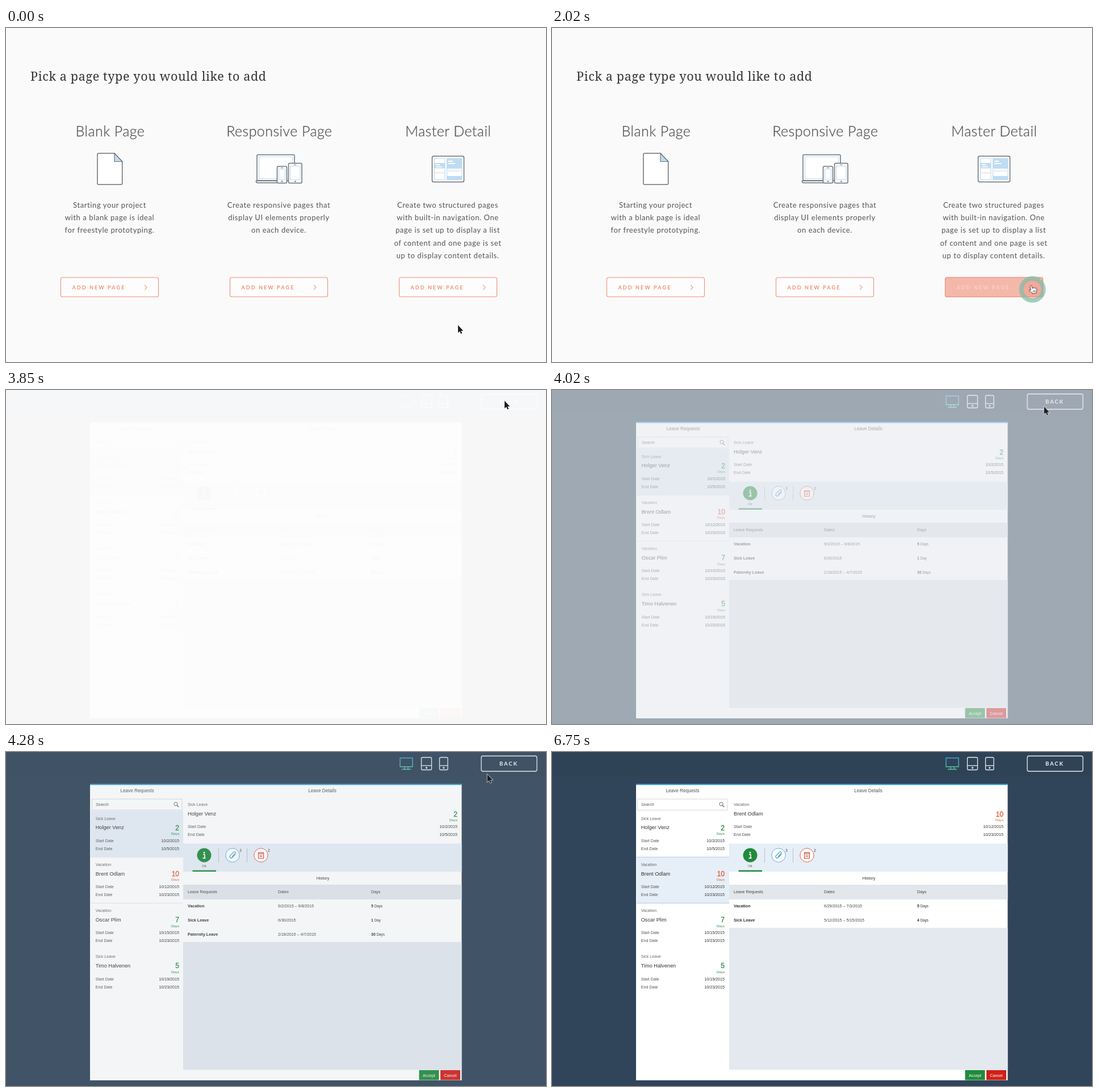
An HTML page that plays this animation: 951 px wide and 589 px high, repeating every 7330 ms.

```html
<!DOCTYPE html>
<html lang="en">
<head>
<meta charset="utf-8">
<title>Page builder walkthrough</title>
<style>
html, body { margin: 0; width: 100%; height: 100%; overflow: hidden; background: #fafafa; }
svg { display: block; width: 100%; height: 100%; }
.lato { font-family: Lato, "Open Sans", sans-serif; }
.arial { font-family: "Liberation Sans", Arial, sans-serif; }
.slab { font-family: "Noto Serif", serif; font-weight: 300; }
text { white-space: pre; }
.line { fill: none; stroke: #50575e; stroke-width: 1.1; }

/* 1% of the loop is 73.3 ms */
.anim { animation: 7.33s linear infinite; }
.cut { animation-timing-function: step-end; }
#picker { animation-name: picker; }
#hover { animation-name: hover; }
#editor { animation-name: editor; }
#dim { animation-name: dim; }
#preview { animation-name: preview; }
#first { animation-name: first; }
#second { animation-name: second; }
#veil { animation-name: veil; }
#ring1 { animation-name: ring1; }
#ring2 { animation-name: ring2; }
#cursor { animation-name: travel; animation-timing-function: ease-in-out; }
#pointer { animation-name: pointer; }
#arrow { animation-name: arrow; }
#hand { animation-name: hand; }

@keyframes picker { 0%, 30.4% { opacity: 1 } 32.5%, 100% { opacity: 0 } }
@keyframes hover { 0%, 24% { opacity: 0 } 26.5%, 100% { opacity: 1 } }
@keyframes editor { 0%, 32% { opacity: 0 } 36.2%, 51.5% { opacity: 1 } 51.6%, 100% { opacity: 0 } }
@keyframes dim { 0%, 37.5% { opacity: 0 } 40.93% { opacity: .14 } 45.7%, 100% { opacity: 1 } }
@keyframes preview { 0% { opacity: 0 } 51.55%, 100% { opacity: 1 } }
@keyframes first { 0% { opacity: 1 } 79.1%, 100% { opacity: 0 } }
@keyframes second { 0% { opacity: 0 } 79.1%, 100% { opacity: 1 } }
@keyframes veil {
  0%, 46.4% { fill: rgba(250,250,250,0) }
  49.8%, 51.6% { fill: rgba(250,250,250,1) }
  52.5%, 53.6% { fill: rgba(253,253,253,.97) }
  55.93%, 57% { fill: rgba(172,181,196,.3) }
  59.5%, 100% { fill: rgba(172,181,196,0) }
}
@keyframes ring1 {
  0%, 25.2% { opacity: 0; r: 8px; stroke-width: 2px }
  25.6% { opacity: 1; r: 10px; stroke-width: 3px }
  27.56%, 28.7% { opacity: 1; r: 19.5px; stroke-width: 8px }
  30.5%, 100% { opacity: 0; r: 25px; stroke-width: 10px }
}
@keyframes ring2 {
  0%, 72.6% { opacity: 0; r: 8px; stroke-width: 2px }
  73.94%, 75% { opacity: 1; r: 11.5px; stroke-width: 3.5px }
  76.5% { opacity: .8; r: 19px; stroke-width: 8px }
  78.5%, 100% { opacity: 0; r: 25px; stroke-width: 10px }
}
@keyframes travel {
  0%, 14.6% { transform: translate(796px,524px) }
  24.56%, 30.7% { transform: translate(843px,454px) }
  40.5%, 47% { transform: translate(882px,20px) }
  52%, 53.5% { transform: translate(878px,19px) }
  55.93%, 57% { transform: translate(859px,36px) }
  71.6%, 100% { transform: translate(236px,221px) }
}
@keyframes pointer { 0%, 86.6% { opacity: 1 } 88.5%, 100% { opacity: 0 } }
@keyframes arrow {
  0% { opacity: 1 } 23.5% { opacity: 0 } 31.5% { opacity: 1 } 39.8% { opacity: 0 }
  51.55% { opacity: 1 } 68.5%, 100% { opacity: 0 }
}
@keyframes hand {
  0% { opacity: 0 } 23.5% { opacity: 1 } 31.5% { opacity: 0 } 39.8% { opacity: 1 }
  51.55% { opacity: 0 } 68.5%, 100% { opacity: 1 }
}
</style>
</head>
<body>
<svg id="stage" viewBox="0 0 951 589"></svg>
<script>
const GREEN = '#218a3c', ORANGE = '#e4572e', SALMON = '#ef9079', SKY = '#bfdcf3', NAVY = '#17406b';

// y is the middle of the capitals
const text = (x, y, s, size, fill = '#444', more = '') =>
  `<text x="${x}" y="${y + size * .36}" font-size="${size}" fill="${fill}" ${more}>${s}</text>`;
const rect = (x, y, w, h, fill, more = '') =>
  `<rect x="${x}" y="${y}" width="${w}" height="${h}" fill="${fill}" ${more}/>`;
const path = (d, more = 'class="line"') => `<path d="${d}" ${more}/>`;
const circle = (x, y, r, more = 'class="line"') => `<circle cx="${x}" cy="${y}" r="${r}" ${more}/>`;
const ink = (color, width = 1, fill = 'none') => `fill="${fill}" stroke="${color}" stroke-width="${width}"`;
const spaced = (n, weight = 400) => ` letter-spacing="${n}" font-weight="${weight}"`;
const END = 'text-anchor="end"', MID = 'text-anchor="middle"', BOLD = 'font-weight="700"';

/* ---- page picker ---- */
function addButton(x) {
  const label = c => text(x + 20.5, 457.5, 'ADD NEW PAGE', 9, c, spaced(2.1, 700));
  const frame = fill => rect(x + .5, 440, 172, 34, fill, `rx="3" stroke="${SALMON}" stroke-width="1.1"`);
  const chevron = path(`M${x + 148} 453l4 4.5l-4 4.5`, ink(SALMON, 1.1));
  const base = frame('#fdfdfd') + label(SALMON) + chevron;
  return x < 600 ? base : base + `<g id="hover" class="anim">${frame('#f4b8ab')}${label('#f9d0c6')}</g>`;
}

function pickerIcons() {
  const edge = ink('#6a7178', 1.5, '#fff'), pale = ink(SKY, 1.2, '#fff');
  const device = (x, y, w, h) =>
    rect(x, y, w, h, '#fff', 'rx="2" stroke="#6a7178" stroke-width="1.5"') +
    path(`M${x + 3} ${y + 5}h${w - 6}v${h - 11}h${6 - w}z`, pale) +
    path(`M${x + w / 2 - 2} ${y + 2.7}h4`, ink('#6a7178')) +
    circle(x + w / 2, y + h - 3, 1.2, 'fill="#6a7178"');
  return path('M163 221H191L204.700 235.500V274q0 2-2 2H163q-2 0-2-2V223q0-2 2-2Z', edge) +
    path('M191 221V235.500H204.700Z', ink('#6a7178', 1.2, SKY)) +
    rect(442, 223.5, 66, 45.5, '#fff', 'rx="2" stroke="#6a7178" stroke-width="1.5"') +
    path('M445.500 227h59v38.500h-59z', pale) +
    path('M440.500 269.500H494v1.500q0 2-3 2H443.500q-3 0-3-2z', edge) +
    device(497.5, 238.5, 23.5, 35) + device(477.5, 244, 17, 29.5) +
    rect(750.5, 226, 56, 45.5, '#fff', 'rx="2.5" stroke="#6a7178" stroke-width="1.5"') +
    path('M754.500 230h18.500v37.500h-18.500z', pale) + rect(755, 238, 18, 9.5, SKY) +
    rect(757, 240, 7, 2, '#fff') + rect(757, 244, 11, 1.5, '#fff') +
    path('M755 255.500h18', ink('#e8c4c4', .8)) +
    path('M776.500 230h26.500v37.500h-26.500z', pale) + rect(776, 230, 27, 18, SKY) +
    rect(779, 234, 8, 2, '#fff') + rect(779, 238, 12, 2, '#fff') +
    path('M778 252h23', ink(SKY)) + rect(776, 261, 27, 6.5, SKY);
}

function picker() {
  const kinds = [
    [182.5, 'Blank Page', ['Starting your project', 'with a blank page is ideal', 'for freestyle prototyping.']],
    [480.5, 'Responsive Page', ['Create responsive pages that', 'display UI elements properly', 'on each device.']],
    [778, 'Master Detail', ['Create two structured pages', 'with built-in navigation. One', 'page is set up to display a list',
      'of content and one page is set', 'up to display content details.']]
  ];
  return rect(0, 0, 951, 589, '#fafafa') +
    `<g class="slab">${text(43, 85, 'Pick a page type you would like to add', 21.5, '#333', 'letter-spacing=".65"')}</g>` +
    kinds.map(([x, title, lines]) =>
      text(x + .9, 181.5, title, 25, '#555', MID + spaced(.45, 300) + ' stroke="#555" stroke-width=".3"') +
      lines.map((s, i) => text(x, 312 + i * 22.3, s, 13, '#555', MID + spaced(.6))).join('') +
      addButton(Math.round(x - 86.3))).join('') +
    pickerIcons();
}

/* ---- the designed app, shared by editor and preview ---- */
const people = [
  ['Sick Leave', 'Holger Venz', 2, '10/2/2015', '10/5/2015'],
  ['Vacation', 'Brent Odlam', 10, '10/12/2015', '10/23/2015'],
  ['Vacation', 'Oscar Plim', 7, '10/15/2015', '10/23/2015'],
  ['Sick Leave', 'Timo Halvenen', 5, '10/19/2015', '10/23/2015']
];
const history = [
  [['Vacation', '9/2/2015 – 9/8/2015', 5], ['Sick Leave', '6/30/2015', 1], ['Paternity Leave', '2/18/2015 – 4/7/2015', 30]],
  [['Vacation', '6/29/2015 – 7/3/2015', 5], ['Sick Leave', '5/12/2015 – 5/15/2015', 4]]
];

// offsets are those of name, number, unit and the two dates below the type
function request([type, name, days, start, end], x, y, right, [dName, dNum, dUnit, dStart, dEnd]) {
  const c = days > 9 ? ORANGE : GREEN;
  return text(x, y, type, 7.2, '#666') + text(x, y + dName, name, 9.2, '#333') +
    text(right, y + dNum, days, 12, c, `${END} stroke="${c}" stroke-width=".3"`) +
    text(right, y + dUnit, 'Days', 6.2, c, END) +
    text(x, y + dStart, 'Start Date', 7.15, '#555') + text(right, y + dStart, start, 7.15, '#333', END) +
    text(x, y + dEnd, 'End Date', 7.15, '#555') + text(right, y + dEnd, end, 7.15, '#333', END);
}

function list(picked, tint) {
  const top = i => 104 + i * 81.25;
  const rule = i => rect(149, top(i) - .4, 163, .8, picked ? '#9cc3e0' : '#dfe3e6');
  return rect(148, 56, 164, 523, '#fff') + rect(149, top(picked), 163, 81.25, tint) + rule(1) + rule(2) +
    `<g transform="translate(${picked ? -1 : 0} 0)">` +
    text(231, 68, 'Leave Requests', 8.2, '#555', MID) +
    rect(151.5, 83, 158.5, 19.5, '#fff', 'stroke="#ccc" stroke-width=".8"') +
    text(158, 92.8, 'Search', 7.2, '#555', 'font-style="italic"') +
    circle(299, 91.8, 3.1, ink('#555', .9)) + path('M301.300 94.100l3 3', ink('#555', 1.2)) +
    people.map((p, i) => request(p, 157.7, 117 + i * 81.25, 305, [16, 16.3, 27, 39.2, 53.2])).join('') + '</g>' +
    rect(148, 56, 164, 2.2, '#3497d8');
}

function detail(picked) {
  const rows = history[picked], bottom = 260 + rows.length * 25;
  const badge = (x, c) => circle(x, 182, 12.2, ink(c, 1, '#fff'));
  return rect(312, 56, 490.5, 523, '#fff') + rect(312, 56, 490.5, 2.2, '#3497d8') +
    text(557, 68, 'Leave Details', 8.2, '#555', MID) +
    request(people[picked], 320, 92.5, 795, [16.3, 16.8, 27, 39.2, 53.2]) +
    rect(312, 161.5, 490.5, 49.5, '#e6eef7') +
    circle(349, 182, 12.5, `fill="${GREEN}"`) + circle(349, 177.3, 1.4, 'fill="#fff"') +
    path('M347 180.500h2.800v6.500M346.500 187.200h5', ink('#fff', 1.7)) +
    text(349, 201, 'Ok', 6.2, '#555', MID) + rect(328.5, 208.5, 41.5, 2.5, GREEN) +
    path('M374.500 170v25M424.500 170v25', ink('#b9c0c6')) +
    badge(399, '#62ade0') + badge(449, '#e2614c') +
    `<g transform="rotate(45 399 182)">${path('M401.500 177v8.500a2.500 2.500 0 0 1-5 0v-9a1.800 1.800 0 0 1 3.600 0v8', ink('#3f97d4', 1.1))}</g>` +
    path('M444.500 177.500h9v10h-9zM444.500 179h9M446.500 182h5M446.500 184.500h5', ink('#d64a35', 1.1)) +
    text(413, 173.5, '3', 6.3, '#444', MID) + text(463, 173.5, '2', 6.3, '#444', MID) +
    text(558, 222.7, 'History', 7.3, '#333', MID) +
    rect(312, 234, 490.5, 26, '#e2e7ec') +
    text(320, 246.5, 'Leave Requests', 7.2) + text(479, 246.5, 'Dates', 7.2) + text(643, 246.5, 'Days', 7.2) +
    rows.map(([kind, dates, n], i) => {
      const y = 271.7 + i * 25;
      return text(320, y, kind, 7.2, '#333', BOLD) + text(479, y, dates, 7.1, '#444') +
        text(643, y, `<tspan ${BOLD}>${n}</tspan><tspan font-size="6.3"> ${n > 1 ? 'Days' : 'Day'}</tspan>`, 7, '#333');
    }).join('') +
    rect(312, bottom, 490.5, 560.5 - bottom, '#e3e9ef') +
    rect(727.5, 561, 35, 17.5, GREEN) + rect(765, 561, 35, 17.5, '#d0201a') +
    text(745, 570, 'Accept', 7.2, '#fff', MID) + text(782.5, 570, 'Cancel', 7.2, '#fff', MID);
}

/* ---- editor ---- */
function devices(x, desk, pad) {
  const p = ink(pad, 1.3);
  const mobile = (x, w) => rect(x, 9.5, w, 22, 'none', `rx="2" stroke="${pad}" stroke-width="1.3"`) +
    path(`M${x} 24h${w}`, p) + circle(x + w / 2, 27.8, 1, p);
  return path(`M${x} 10.500h22v15.500h-22zM${x + 8} 26v4M${x + 14} 26v4M${x + 3} 30.500h16`, ink(desk, 1.3)) +
    mobile(x + 37.5, 18) + mobile(x + 69.5, 14.5);
}

function toolbar() {
  const handles = [[416, 11], [434, 11], [416, 28], [434, 28]].map(([x, y]) => path(`M${x} ${y}h4v4h-4z`, ink('#50575e', 1.1, '#fff'))).join('');
  return rect(0, 0, 951, 44, '#fff') + rect(0, 43.5, 951, 1.5, '#dcdddf') +
    path('M22.500 11.500h7v5h-7zM26 16.500v5M20 25v-3.500h12.500V25M26 21.500V25M17.500 25h4.500v4.500h-4.500zM24 25h4.500v4.500h-4.500zM30.500 25h4.500v4.500h-4.500z') +
    devices(240.5, '#50575e', '#50575e') +
    path('M379.500 15.500h23v10h-23zM383 19v6M386.500 21v4M390 19v6M393.500 21v4M397 19v6M400 21v4') +
    path('M418 13h18v17h-18z') + handles +
    path('M456 11.500v19') + rect(457, 13.5, 8, 5.5, '#444b52') + rect(457, 22, 13, 5.5, '#444b52') +
    path('M534 13h16v16h-16zM539.500 13v16M569 13h16v16h-16zM579.500 13v16') +
    text(603, 21, '87%', 12, '#666', spaced(.4)) +
    path('M649 16l-4 4l4 4M645 20h14v6', ink('#b5b9bd', 1.2)) + path('M683 16l4 4l-4 4M687 20h-15v6') +
    path('M767 12.500h6M768.300 12.500v6l-6 11h15.500l-6-11v-6M765.500 23.500h9') +
    path('M802.500 14.500h14v12.500h-16.500v-9h2.500v9') + rect(805, 17, 5, 4.5, '#444b52') + path('M811.500 18h3.500M811.500 20.800h3.500M805 24h10') +
    rect(837, 7, 98, 27, '#fff', 'rx="3" stroke="#50575e" stroke-width="1.2"') +
    text(858, 20.7, 'PREVIEW', 9.5, '#555c63', spaced(2.1, 700));
}

function sidebar() {
  const tree = [153, 174.5, 198.5, 222.5];
  const label = (x, y, s, c = '#606468', w = 400) => text(x, y, s, 11.3, c, spaced(.45, w));
  const tab = (x, s, c) => text(x, 308.5, s, 8.5, c, spaced(1.3, 700));
  const frame = y => path(`M16 ${y - 11}h22v22h-22zM16 ${y - 5}h22`);
  const dashes = y => path(`M19 ${y}h16`, ink('#50575e', 1.5) + ' stroke-dasharray="3 1.5"');
  const dot = x => circle(x, 517.5, 2.2, 'fill="#50575e"');
  return rect(0, 45, 219, 544, '#fff') + rect(219, 45, 2, 544, '#e2e4e6') +
    text(16, 69, 'PAGES', 8.8, '#2c5a86', spaced(1.2, 700)) + path('M192 69h14M199 62v14') +
    label(16, 99.5, 'Master Page 1') + rect(16, 113, 2.5, 24, '#52b788') +
    label(29, 124.5, 'List <tspan font-size="9" font-weight="400" fill="#777">(5)</tspan>', '#45ae7c', 700) +
    path('M17.500 147v101M29.500 147v101', ink('#e4e4e4')) +
    tree.map(y => label(40, y, 'List Item')).join('') + label(40, 244, 'Search Field Toolbar') + label(16, 266.5, 'Detail Page 1', '#c2c4c6') +
    rect(0, 281.5, 219, 1, '#e6e8ea') + rect(99, 283, 19, 5.5, '#cfd3d6') +
    rect(0, 289.5, 219, 37, NAVY) + rect(0, 291, 71.5, 36, '#fff') + rect(144.5, 289, 1.3, 38, '#fff') +
    tab(9, 'CONTROLS', '#2c5a86') + tab(91, 'ASSETS', '#fff') + tab(169, 'DATA', '#fff') +
    path('M16 367V342h184.500V367', ink('#dfe2e4')) +
    circle(28, 354, 4) + path('M31 357l4 4', ink('#50575e', 1.6)) +
    text(42, 355.5, 'Find UI Element', 10.5, '#888', spaced(.15)) + path('M185 351.500l6.500 6.500M191.500 351.500l-6.500 6.500', ink('#888')) +
    ['Column', 'Column List Item', 'List', 'List Item', 'Table'].map((s, i) => label(53, 399 + i * 41.75, s)).join('') +
    frame(399) + path('M23 394v16M30.500 394v16') +
    frame(440.5) + dashes(432.5) +
    rect(16.5, 471.5, 18, 18, '#fff', 'stroke="#50575e"') + rect(18, 473, 15, 15, '#5fb98d') +
    path('M22 475l16 7l-6 2l6 6l-3 3l-6-6l-2.500 6z', 'fill="#444b52"') +
    dot(19) + dot(27) + dot(35) + path('M16 533v-8h6q2 4 5 4t5-4h6v8z') +
    frame(566) + dashes(558);
}

function editor() {
  return rect(0, 0, 951, 589, '#f8f8f9') + rect(244, 49, 685.5, 540, '#fdfdfd') +
    `<g class="arial" transform="translate(89 -9.4) scale(1.046)"><g id="dim" class="anim">${detail(0)}</g>${list(0, '#e3f4f6')}</g>` +
    toolbar() + sidebar();
}

/* ---- preview ---- */
function preview() {
  return rect(0, 0, 951, 589, '#304559') + rect(0, 0, 951, 43, '#2f4357') +
    devices(694, 'url(#teal)', '#e8edf1') +
    rect(837, 7, 98, 27, 'none', 'rx="3" stroke="#e8edf1" stroke-width="1.3"') +
    text(869, 20.7, 'BACK', 9.5, '#f2f5f7', spaced(1.9, 700)) +
    [0, 1].map(i => `<g id="${i ? 'second' : 'first'}" class="arial anim cut">${detail(i)}${list(i, '#e6eef7')}</g>`).join('');
}

const cursor = `<g id="cursor" class="anim"><g id="pointer" class="anim">
  <g id="arrow" class="anim cut">${path('M0 0V13.500L3.100 10.700L5.200 15.200L7.400 14.200L5.300 9.900H9.300Z', ink('#fff', 1.2, '#1d1d1f') + ' paint-order="stroke"')}</g>
  <g id="hand" class="anim cut">${path('M-1.600 1.200Q0-1.400 1.600 1.200V5.500Q3 4.300 4.200 5.600Q5.800 4.800 6.600 6.300Q8.800 5.700 9 7.800V10Q8.800 12 7.500 13.500V15H0V13.500L-4 9.200Q-4.800 6.800-2.600 7.200L-1.600 8.300ZM2.200 10v2.500M4.200 10v2.500M6.200 10v2.500',
    ink('#333', .9, '#fff') + ' transform="rotate(-12)"')}</g></g></g>`;

document.getElementById('stage').innerHTML =
  `<defs><linearGradient id="teal" x1="0" y1="0" x2="0" y2="1"><stop stop-color="#3fa9d6"/><stop offset="1" stop-color="#5cc79a"/></linearGradient></defs>
  <g class="lato">
    <g id="picker" class="anim">${picker()}</g>
    <g id="editor" class="anim">${editor()}</g>
    <g id="preview" class="anim cut">${preview()}</g>
  </g>
  <rect id="veil" class="anim" width="951" height="589"/>
  <circle id="ring1" class="anim" cx="846" cy="461" fill="rgba(236,125,100,.25)" stroke="rgba(125,190,170,.7)"/>
  <circle id="ring2" class="anim" cx="239" cy="228" fill="rgba(255,255,255,.6)" stroke="rgba(58,160,110,.8)"/>` + cursor;
</script>
</body>
</html>
```
